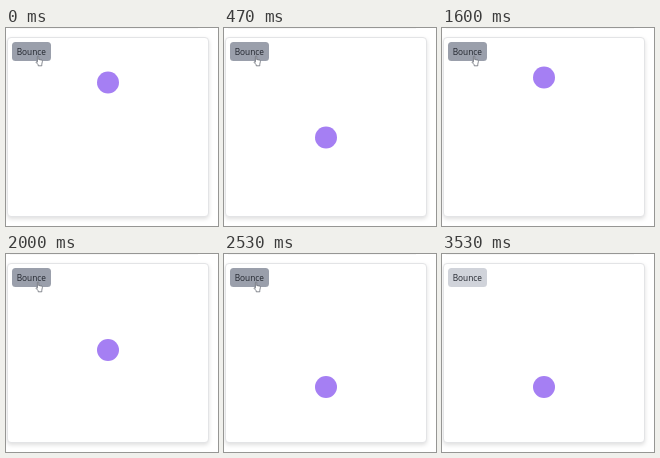
An HTML page that plays this animation: 212x198 px, repeating every 3.59 s.

```html
<!DOCTYPE html>
<html lang="en">
<head>
<meta charset="utf-8">
<title>Bounce</title>
<style>
  html, body { margin: 0; width: 100%; height: 100%; overflow: hidden; background: #fff; }
  .stage { position: relative; width: 212px; height: 198px; overflow: hidden; }
  .stage > * { position: absolute; box-sizing: border-box; }
  .edge { left: 4px; top: 0; width: 188px; height: 1px; background: #f7f7f7; }
  .card {
    left: 1px; top: 9px; width: 202px; height: 180px;
    border: 1px solid #e3e4e6; border-radius: 4px; background: #fff;
    box-shadow: 0 2px 4px rgba(0, 0, 0, .13);
  }
  .button {
    left: 6px; top: 14px; width: 38.5px; height: 18.5px;
    border-radius: 3.5px; background: #d0d3da; color: #20242c;
    font: 8.3px/19px "Open Sans", "Noto Sans", sans-serif; text-align: center;
  }
  .hover .button { background: #9a9fab; }
  .ball {
    left: 91px; top: 121.5px; width: 22px; height: 22px;
    border-radius: 50%; background: #a57ff3;
  }
  .hand { left: 29px; top: 27px; visibility: hidden; }
  .hover .hand { visibility: visible; }
</style>
</head>
<body>
<div class="stage hover" id="stage">
  <div class="edge"></div>
  <div class="card"></div>
  <div class="button">Bounce</div>
  <div class="ball" id="ball"></div>
  <svg class="hand" width="9" height="12" viewBox="0 0 9 12">
    <path d="M2.4 7.2V1.4Q3 .5 3.7 1.4V4.5L6.6 5.1Q7.5 5.3 7.4 6.4L6.8 9.2V10.8H3.2V9.8L1 7.2Q.9 6.2 2.4 7.2Z"
      fill="#fff" stroke="#555a64" stroke-width=".7" stroke-linejoin="round"/>
  </svg>
</div>
<script>
  const LOOP = 3590, TICK = 200 / 3, DROP = 200, LEAVE = 2660;
  // Each drop enters view part of the way through its fall.
  const drops = [
    { at: 0, phase: 0.2834, length: 1155 },
    { at: 1600, phase: 0.2775, length: 1051 }
  ];
  const stage = document.getElementById("stage");
  const ball = document.getElementById("ball");

  function bounceOut(t) {
    if (t < 4 / 11) return 7.5625 * t * t;
    if (t < 8 / 11) return 9.075 * t * t - 9.9 * t + 3.4;
    if (t < 0.9) return (4356 * t * t) / 361 - (35442 * t) / 1805 + 16061 / 1805;
    return 10.8 * t * t - 20.52 * t + 10.72;
  }

  function draw(ms) {
    const now = Math.floor((ms + 3.4) / TICK) * TICK;
    const drop = now < 1599 ? drops[0] : drops[1];
    const t = Math.min(1, drop.phase + (now - drop.at) / drop.length);
    const y = DROP * (bounceOut(t) - 1);
    ball.style.transform = `translateY(${y.toFixed(2)}px)`;
    stage.classList.toggle("hover", now < LEAVE);
  }

  const start = performance.now();
  function frame() {
    draw((performance.now() - start) % LOOP);
    requestAnimationFrame(frame);
  }
  draw(0);
  requestAnimationFrame(frame);
</script>
</body>
</html>
```
